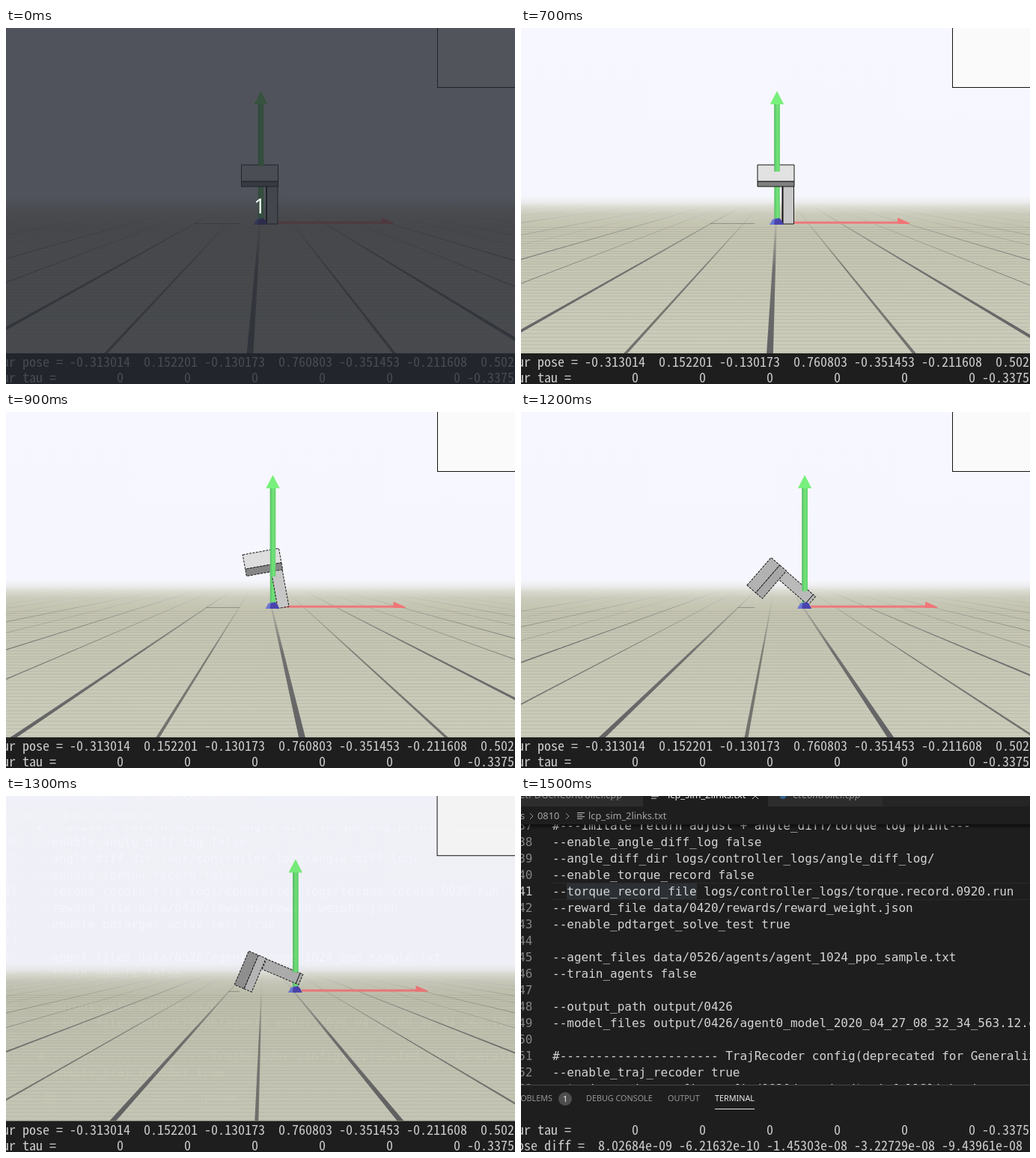
An HTML page with a canvas that plays this animation: 680x476 px, repeating every 1.6 s.

```html
<!DOCTYPE html>
<html>
<head>
<meta charset="utf-8">
<style>
html, body { margin: 0; width: 100%; height: 100%; overflow: hidden; background: #1e1e1e; }
canvas { display: block; }
</style>
</head>
<body>
<canvas id="stage" width="680" height="476"></canvas>
<script>
const ctx = document.getElementById('stage').getContext('2d');
const LOOP = 1600;
const MONO = '"DejaVu Sans Mono", monospace';
const NARROW = '"Noto Sans Mono CJK JP", "Noto Sans Mono CJK SC", "Noto Sans Mono", monospace';
const UI = '"Noto Sans", sans-serif';
const VANISH = { x: 343, y: 211 };
const FLOOR = 435;

const gray = v => `rgb(${v},${v},${v})`;

function rect(x, y, w, h, fill) {
  ctx.fillStyle = fill;
  ctx.fillRect(x, y, w, h);
}

function text(str, x, y, font, fill, align = 'left') {
  ctx.font = font;
  ctx.fillStyle = fill;
  ctx.textAlign = align;
  ctx.fillText(str, x, y);
}

function poly(points, fill, stroke) {
  ctx.beginPath();
  points.forEach(([x, y]) => ctx.lineTo(x, y));
  ctx.closePath();
  ctx.fillStyle = fill;
  ctx.fill();
  if (stroke) {
    ctx.strokeStyle = stroke;
    ctx.stroke();
  }
}

function line(x1, y1, x2, y2, color, width = 1) {
  ctx.beginPath();
  ctx.moveTo(x1, y1);
  ctx.lineTo(x2, y2);
  ctx.strokeStyle = color;
  ctx.lineWidth = width;
  ctx.stroke();
}

function disc(x, y, r, fill) {
  ctx.beginPath();
  ctx.arc(x, y, r, 0, 7);
  ctx.fillStyle = fill;
  ctx.fill();
}

// ---- editor behind the simulation window ----

const FIRST_LINE = 37;
const CODE = [
  '#---imitate return adjust + angle_diff/torque log print---',
  '--enable_angle_diff_log false',
  '--angle_diff_dir logs/controller_logs/angle_diff_log/',
  '--enable_torque_record false',
  '--torque_record_file logs/controller_logs/torque.record.0920.run',
  '--reward_file data/0420/rewards/reward_weight.json',
  '--enable_pdtarget_solve_test true',
  '',
  '--agent_files data/0526/agents/agent_1024_ppo_sample.txt',
  '--train_agents false',
  '',
  '--output_path output/0426',
  '--model_files output/0426/agent0_model_2020_04_27_08_32_34_563.12.ckpt',
  '',
  '#' + '-'.repeat(22) + ' TrajRecoder config(deprecated for Generalized)',
  '--enable_traj_recoder true',
  '--traj_recoder_config config/0820/recoder/traj_full2links.json'
];

const POSE = 'cur pose = -0.313014  0.152201 -0.130173  0.760803 -0.351453 -0.211608  0.502814';
const TAU = 'cur tau = ' + '0'.padStart(9) + '0'.padStart(10).repeat(5) + ' -0.337562';
const DIFF = 'pose diff =  8.02684e-09 -6.21632e-10 -1.45303e-08 -3.22729e-08 -9.43961e-08';

function fileIcon(x, y) {
  [10, 7, 10, 7].forEach((w, i) => rect(x, y + i * 2.6, w, 1, gray(190)));
}

function drawEditor() {
  rect(0, 0, 680, 476, gray(30));
  ctx.save();
  ctx.beginPath();
  ctx.rect(0, 38, 680, 348);
  ctx.clip();
  line(42, 116.5, 680, 116.5, gray(42));
  line(42, 138.5, 680, 138.5, gray(42));
  rect(61, 117, 174, 21, '#2c3035');
  CODE.forEach((str, i) => {
    const y = 45 + 22 * i, num = FIRST_LINE + i;
    text(num, 15.5, y, '16px ' + MONO, gray(num === 41 ? 198 : 133), 'right');
    text(str, 42, y, '16px ' + MONO, gray(212));
  });
  const shadow = ctx.createLinearGradient(0, 38, 0, 44);
  shadow.addColorStop(0, 'rgba(0,0,0,.6)');
  shadow.addColorStop(1, 'rgba(0,0,0,0)');
  rect(0, 38, 680, 6, shadow);
  ctx.restore();

  const tab = '12.8px ' + UI;
  rect(0, 0, 680, 14, '#252526');
  rect(0, 0, 163, 14, gray(45));
  rect(163, 0, 167, 14, gray(30));
  rect(330, 0, 153, 14, gray(45));
  text('CtPDGenController.cpp', 135, 3, tab, gray(145), 'right');
  fileIcon(174, -5);
  text('lcp_sim_2links.txt', 196, 3, tab, gray(235));
  line(309, -4, 317, 4, gray(210));
  line(309, 4, 317, -4, gray(210));
  disc(350, 0, 4, '#35618e');
  text('CtController.cpp', 363, 3, 'italic ' + tab, gray(145));
  text('s', -1, 31, tab, gray(165));
  text('0810', 22, 31, tab, gray(165));
  text('lcp_sim_2links.txt', 90, 31, tab, gray(165));
  for (const x of [12, 60]) {
    line(x, 23, x + 4, 27, gray(150));
    line(x + 4, 27, x, 31, gray(150));
  }
  fileIcon(75, 22);

  const label = '10.8px ' + UI;
  line(0, 386.5, 680, 386.5, gray(70));
  text('PROBLEMS', 42, 408, label, gray(150), 'right');
  disc(59, 405, 9, gray(77));
  text('1', 59, 409, label, gray(245), 'center');
  text('DEBUG CONSOLE', 87, 408, label, gray(150));
  text('OUTPUT', 196, 408, label, gray(150));
  text('TERMINAL', 259, 408, label, gray(235));
  rect(259, 418, 53, 1, gray(231));
}

// Terminal cells are 9px wide; the font size follows from its advance.
ctx.font = '100px ' + NARROW;
const TERM_FONT = `${900 / ctx.measureText('0').width}px ${NARROW}`;

function drawTerminal(rows) {
  rows.forEach((row, i) => text(row, -14, 452.5 + 21 * i, TERM_FONT, gray(204)));
}

// ---- simulation window ----

const LEFT = -58, WIDTH = 810;

function drawGround(shift) {
  const fog = ctx.createLinearGradient(0, -22, 0, FLOOR);
  const stops = [
    [-22, '247,247,255'], [224, '246,246,254'], [232, '238,238,240'],
    [240, '218,218,208'], [248, '204,204,190'], [262, '196,196,177'], [FLOOR, '203,204,186']
  ];
  stops.forEach(([y, rgb]) => fog.addColorStop((y + 22) / (FLOOR + 22), `rgb(${rgb})`));
  rect(LEFT, -22, WIDTH, FLOOR + 22, fog);

  for (let y = 266; y < FLOOR; y += 3 + (y - 266) / 75)
    rect(LEFT, Math.round(y), WIDTH, 1, 'rgba(110,110,112,.16)');

  const top = 238, scale = (top - VANISH.y) / (FLOOR - VANISH.y);
  for (let k = -16; k <= 16; k++) {
    const major = k % 2 === 0;
    const dx = 326 + shift + 192.7 * k - VANISH.x;
    const half = major ? 4.4 : 2.5;
    const rgb = major ? '98,98,100' : '112,112,108';
    const fade = ctx.createLinearGradient(0, top, 0, FLOOR);
    fade.addColorStop(0, `rgba(${rgb},0)`);
    fade.addColorStop(.12, `rgba(${rgb},${Math.min(.5, .12 + Math.abs(dx) / 1400)})`);
    fade.addColorStop(.42, `rgba(${rgb},.85)`);
    fade.addColorStop(1, `rgb(${rgb})`);
    const edge = s => VANISH.x + (dx + s * half) * scale;
    poly([
      [edge(-1), top], [edge(1), top],
      [VANISH.x + dx + half, FLOOR], [VANISH.x + dx - half, FLOOR]
    ], fade);
  }
  line(251 + shift * .228, 261.5, 312, 261.5, 'rgba(110,110,105,.6)');
}

function drawUpArrow(x, bottom) {
  const shade = ctx.createLinearGradient(x - 4, 0, x + 4, 0);
  shade.addColorStop(0, '#58bd66');
  shade.addColorStop(.55, '#72e479');
  shade.addColorStop(1, '#62cf6c');
  rect(x - 3.7, 100, 7.4, bottom - 100, shade);
  poly([[x - 9, 102], [x, 84.5], [x + 9, 102]], '#79f07d');
}

// Two links turning rigidly about the foot; k runs 0..1 over the fall.
function drawRobot(x, k, angle, standing) {
  ctx.save();
  ctx.translate(x + 15 - 8 * k * k, 262 - 16.5 * k ** 3);
  ctx.rotate(-angle);
  ctx.lineWidth = 1;
  if (k > 0) ctx.setLineDash([3, 1.5]);
  const box = (l, t, r, b, v) => poly([[l, t], [r, t], [r, b], [l, b]], gray(Math.round(v)), '#161616');
  const split = -57 - 8 * k, low = -50 - 4 * k ** 4;
  box(-7.5, -53, 7.5, 0, (standing ? 187 : 200) - 24 * k ** 3);
  ctx.setLineDash([]);
  if (k < .3) line(-7.5, -53, -7.5, 0, '#111', 2);
  if (k > .5) line(-7.5, -4, 7.5, -4, '#222');
  ctx.lineWidth = 1;
  if (k > 0) ctx.setLineDash([3, 1.5]);
  box(-41, split, 8, low, 128 + 57 * k * k);
  box(-41, -79, 8, split, (standing ? 220 : 226) - 80 * k ** 2.8);
  ctx.restore();
}

function drawScene(t) {
  const standing = t < 700;
  const step = standing ? 0 : Math.min(6, Math.floor((t - 700) / 100));
  const shift = standing ? 0 : 6.5 + 31 * step + .25 * step * step;
  const angle = 33.5 * (step / 4) ** 1.71 * Math.PI / 180;
  const x = 340.5 + .23 * shift;

  drawGround(shift);
  ctx.lineWidth = 1;
  ctx.strokeStyle = '#111';
  rect(576.5, -11.5, 162, 91, '#fafafb');
  ctx.strokeRect(576.5, -11.5, 162, 91);

  drawUpArrow(x, 258);
  rect(x + 8, 258.7, 154, 3, '#ee797b');
  poly([[x + 161, 253.5], [x + 178, 261], [x + 176, 262], [x + 161, 262]], '#f07577');
  drawRobot(x, step / 6, angle, standing);
  drawUpArrow(x, standing ? 185 : Math.min(192 + 14 * step, 258 - 3.7 * step));
  poly([[x - 10, 263], [x - 6, 256], [x, 254], [x + 2, 263]], '#6978d2');
  poly([[x - 4, 263], [x - 3, 256], [x + 3, 254], [x + 6, 257], [x + 9, 263]], '#4a43ae');
}

function drawWindow(t) {
  const leaving = t >= 1300, scale = t >= 1400 ? .83 : .998;
  ctx.save();
  if (leaving) {
    ctx.translate(350, 196);
    ctx.scale(scale, scale);
    ctx.translate(-350, -196);
  }
  rect(LEFT, -45, WIDTH, 23, '#46443f');
  text('HushHeron', 342, -26, 'bold 15.5px ' + UI, '#fff', 'center');
  for (const [x, fill] of [[691, gray(105)], [712, gray(105)], [733, '#e8562a']])
    disc(x, -31, 7, fill);
  drawScene(t);
  ctx.restore();
}

// The window is flattened on its own layer so that it fades as a whole.
const stage = ctx.canvas;
const layer = document.createElement('canvas');
layer.width = 680;
layer.height = 476;
const front = layer.getContext('2d');

function render(t) {
  ctx.globalAlpha = 1;
  ctx.clearRect(0, 0, 680, 476);
  if (t < 1500) {
    drawWindow(t);
    front.clearRect(0, 0, 680, 476);
    front.drawImage(stage, 0, 0);
  }
  drawEditor();
  drawTerminal(t < 1400 ? [POSE, TAU] : [TAU, DIFF]);
  if (t < 1500) {
    ctx.globalAlpha = t < 1300 ? 1 : t < 1400 ? .97 : .16;
    ctx.drawImage(layer, 0, 0);
    ctx.globalAlpha = 1;
  }
  if (t < 200) {
    rect(0, 0, 680, 476, 'rgba(37,40,49,.79)');
    text('1', 339, 248, '27px ' + UI, '#f4fff4', 'center');
  }
}

const start = performance.now();
function tick() {
  render((performance.now() - start) % LOOP);
  requestAnimationFrame(tick);
}
tick();
</script>
</body>
</html>
```
